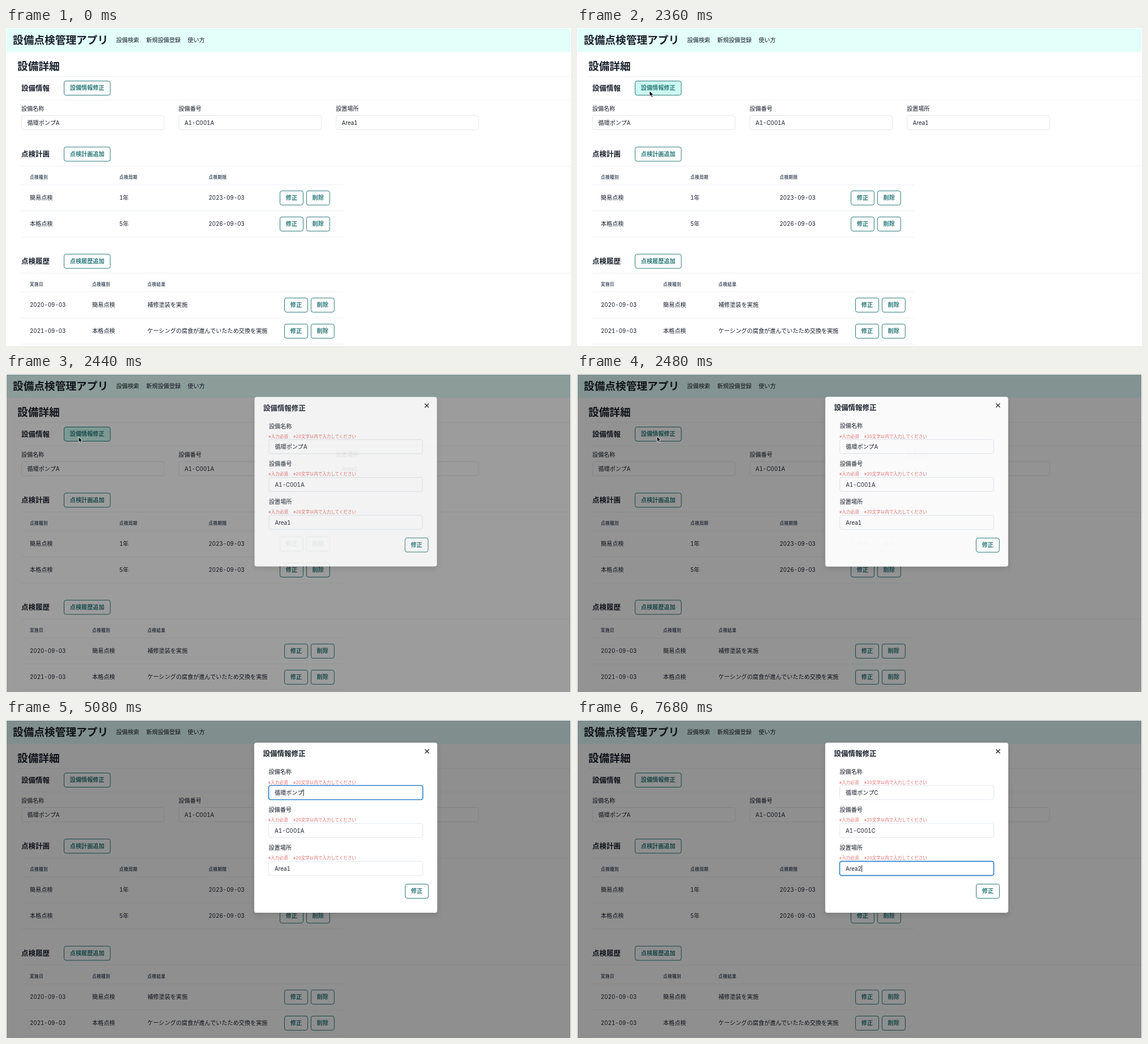
Write an HTML page that moves like this. It is 997 px wide and 561 px high and loops after 8 s.

```html
<!DOCTYPE html>
<html lang="ja">
<head>
<meta charset="utf-8">
<title>設備点検管理アプリ</title>
<style>
  html, body { margin: 0; width: 100%; height: 100%; overflow: hidden; background: #fff; }
  svg { display: block; width: 997px; height: 561px; }
  text { font: 400 10.15px Inter, "Noto Sans CJK JP", "Noto Sans CJK", sans-serif; fill: #1a202c; font-variant-numeric: tabular-nums; }
  .latin { font-size: .965em; }
  .h1 { font-size: 18.7px; font-weight: 700; }
  .h2 { font-size: 12.5px; font-weight: 700; }
  .th { font-size: 7.6px; font-weight: 700; letter-spacing: .05em; fill: #4a5568; }
  .hint { font-size: 7.5px; fill: #e56b6b; }
  .action { font-weight: 600; fill: #2c7a7b; }
  .button { fill: #fff; stroke: #2c7a7b; }
  .field { fill: #fff; stroke: #e2e8f0; }
  .focus { fill: none; stroke: #3182ce; stroke-width: 1.7; }
  .rule { stroke: #edf2f7; }
  #dialog > .panel { fill: #fff; filter: drop-shadow(0 4px 5px rgba(0, 0, 0, .12)); }
</style>
</head>
<body>
<svg viewBox="0 0 997 561">
  <g id="page"></g>
  <rect id="shade" x="1" y="1" width="995" height="560"/>
  <g id="dialog"></g>
  <path id="arrow" d="M0 0V9.6L2.2 7.6L3.8 11.3L5.6 10.5L4 7L7 6.8Z" fill="#000" stroke="#fff" stroke-width=".8"/>
  <path id="beam" d="M-2.2 -5Q0 -5 0 -3.6Q0 -5 2.2 -5M0 -3.6V3.6M-2.2 5Q0 5 0 3.6Q0 5 2.2 5M-1.2 1.8H1.2" fill="none" stroke="#222"/>
</svg>
<script>
const LOOP = 8000, STEP = 40;
const $ = id => document.getElementById(id);

const markup = s => s.replace(/[!-~]+/g, m => `<tspan class="latin">${m}</tspan>`);
const sizes = { h1: 18.7, h2: 12.5, th: 7.6, hint: 7.5 };

// Text is placed by its left edge and vertical centre.
const text = (x, y, s, cls = 'body', id = '') =>
  `<text ${id && `id="${id}"`} class="${cls}" x="${x}" y="${y + .38 * (sizes[cls] || 10.15)}">${markup(s)}</text>`;
const box = (x, y, w, h, cls, id = '') =>
  `<rect ${id && `id="${id}"`} class="${cls}" x="${x + .5}" y="${y + .5}" width="${w - 1}" height="${h - 1}" rx="3.6"/>`;
const rule = (x1, x2, y) => `<path class="rule" d="M${x1} ${y + .5}H${x2}"/>`;
const button = (x, y, s, id) =>
  box(x, y, s.length * 10.15 + 21.6, 26, 'button', id) + text(x + 10.8, y + 12.5, s, 'action');

function section(y, title, action, id) {
  return text(27, y, title, 'h2') + button(102, y - 13, action, id) + rule(27, 996, y + 20.5);
}

function table(y, columns, head, rows, buttonX) {
  const cells = (row, cy, cls) => row.map((s, i) => text(columns[i], cy, s, cls)).join('');
  return cells(head, y, 'th') + rule(27, 595, y + 13) + rows.map((row, i) => {
    const cy = y + 36.5 + 46 * i;
    return cells(row, cy) + button(buttonX, cy - 12.7, '修正') +
      button(buttonX + 46.8, cy - 12.7, '削除') + rule(27, 595, cy + 22.5);
  }).join('');
}

const labels = ['設備名称', '設備番号', '設置場所'];
const values = ['循環ポンプA', 'A1-C001A', 'Area1'];

$('page').innerHTML =
  '<rect x="1" y="1" width="995" height="41" fill="#e3fffa"/>' +
  text(12, 20.5, '設備点検管理アプリ', 'h1') +
  text(194.5, 21, '設備検索') + text(247.5, 21, '新規設備登録') + text(320.5, 21, '使い方') +
  text(20, 66.5, '設備詳細', 'h1') + rule(20, 996, 85) +
  section(106, '設備情報', '設備情報修正', 'edit') +
  labels.map((s, i) => {
    const x = 27 + 277.5 * i;
    return text(x, 142, s) + box(x, 154, 252.5, 26, 'field') + text(x + 10.5, 167.5, values[i]);
  }).join('') +
  section(222.5, '点検計画', '点検計画追加') +
  table(263, [42, 200, 357.5], ['点検種別', '点検周期', '点検期限'],
    [['簡易点検', '1年', '2023-09-03'], ['本格点検', '5年', '2026-09-03']], 483) +
  section(411.5, '点検履歴', '点検履歴追加') +
  table(452, [42, 152, 249.5], ['実施日', '点検種別', '点検結果'],
    [['2020-09-03', '簡易点検', '補修塗装を実施'],
     ['2021-09-03', '本格点検', 'ケーシングの腐食が進んでいたため交換を実施']], 491);

$('dialog').innerHTML =
  '<rect class="panel" x="438" y="40" width="323" height="300" rx="4"/>' +
  text(453.5, 59.5, '設備情報修正', 'h2') +
  '<path d="M739.5 51.7l7 7m0 -7l-7 7" stroke="#1a202c" stroke-width="1.3"/>' +
  labels.map((s, i) => {
    const y = 66.9 * i;
    return text(463.5, y + 91.5, s) +
      text(462.5, y + 109.7, '※入力必須', 'hint') + text(506.5, y + 109.7, '※20文字以内で入力してください', 'hint') +
      box(463, y + 115, 273, 26, 'field') + box(463, y + 115, 273, 26, 'focus', 'focus' + i) +
      text(474, y + 128.3, values[i], 'body', 'value' + i);
  }).join('') +
  button(704, 289, '修正') +
  '<path id="caret" stroke="#1a202c"/>';

// Rows are [time, ...numbers], blended linearly between times.
const pointer = [[520, 330, 300], [1280, 300, 250], [1680, 235, 195], [2000, 145, 121], [2160, 128, 111],
  [2440, 128, 111], [2480, 141, 110], [2720, 280, 112], [3000, 430, 122], [3320, 560, 130], [3480, 583, 130]];
const opening = [[2360, 0], [2400, .6], [2440, .88], [2480, .96], [2520, 1]];
const edits = [
  { focus: 3560, blur: 5440, keys: [[4920, '循環ポンプ'], [5160, '循環ポンプC']] },
  { focus: 5440, blur: 7000, keys: [[6560, 'A1-C001'], [6760, 'A1-C001C']] },
  { focus: 7000, blur: LOOP, keys: [[7520, 'Area'], [7640, 'Area2']] }
];

const clamp = v => Math.max(0, Math.min(1, v));
function blend(rows, t) {
  const next = rows.findIndex(r => r[0] > t);
  if (next === 0) return rows[0].slice(1);
  if (next < 0) return rows[rows.length - 1].slice(1);
  const a = rows[next - 1], b = rows[next], k = (t - a[0]) / (b[0] - a[0]);
  return a.slice(1).map((v, i) => v + (b[i + 1] - v) * k);
}

function drawFields(t) {
  let caret = '';
  edits.forEach(({ focus, blur, keys }, i) => {
    const done = keys.filter(k => k[0] <= t).pop();
    const value = $('value' + i);
    value.innerHTML = markup(done ? done[1] : values[i]);
    $('focus' + i).style.opacity = clamp((t - focus) / 200) - clamp((t - blur) / 200);
    if (done && t < blur) {
      const x = 474.7 + value.getComputedTextLength();
      caret = `M${x} ${66.9 * i + 122.2}v12`;
    }
  });
  $('caret').setAttribute('d', caret);
}

function draw(t) {
  const [open] = blend(opening, t), scale = .97 + .03 * open;
  $('shade').style.opacity = .44 * open;
  $('dialog').style.opacity = open;
  $('dialog').setAttribute('transform', `translate(599.5 190) scale(${scale}) translate(-599.5 -190)`);
  $('edit').style.fill = t < 2040 || t >= 2480 ? '#fff' : t < 2280 ? '#e6fffa' : '#ccfaf1';
  drawFields(t);

  const [x, y] = blend(pointer, t);
  const shown = t >= 520 && t < 4160, overField = t > 2520 && x > 463;
  $('arrow').style.display = shown && !overField ? '' : 'none';
  $('beam').style.display = shown && overField ? '' : 'none';
  for (const id of ['arrow', 'beam']) $(id).setAttribute('transform', `translate(${x} ${y})`);
}

const start = performance.now();
function tick() {
  const t = (performance.now() - start) % LOOP;
  draw(Math.floor(t / STEP) * STEP);
  requestAnimationFrame(tick);
}
tick();
</script>
</body>
</html>
```
